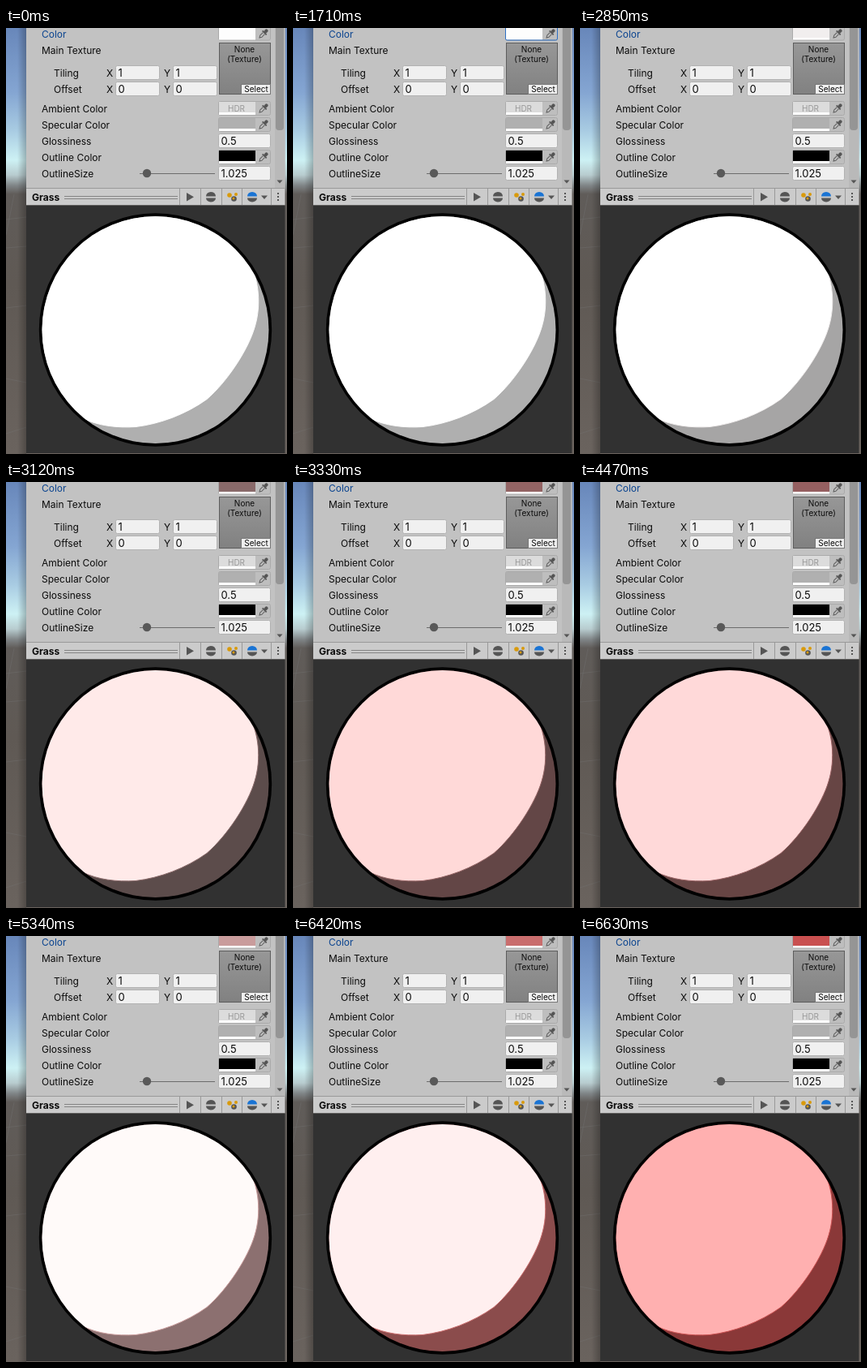
Animation of 347 by 525 pixels, one loop 8 s. Source, as an HTML page:

```html
<!DOCTYPE html>
<html lang="en">
<head>
<meta charset="utf-8">
<title>Material inspector</title>
<style>
  html, body { margin: 0; width: 100%; height: 100%; overflow: hidden; background: #313131; }
  svg { display: block; width: 347px; height: 525px; }
  text { font: 12px Inter, sans-serif; fill: #0b0b0b; }
  .small { font-size: 10px; text-anchor: middle; }
  .field { fill: #f0f0f0; stroke: #b2b2b2; }
  .swatch { stroke: #aaa; fill: #bebebe; }
  .icon { fill: #555; }
  .line { stroke: #999; }
</style>
</head>
<body>
<svg viewBox="0 0 347 525">
  <defs>
    <linearGradient id="scene" x2="0" y2="1">
      <stop offset="0" stop-color="#6887ba"/>
      <stop offset=".15" stop-color="#84a5d2"/>
      <stop offset=".24" stop-color="#a8cbe2"/>
      <stop offset=".31" stop-color="#cdf1f4"/>
      <stop offset=".345" stop-color="#b8cccf"/>
      <stop offset=".37" stop-color="#7f8486"/>
      <stop offset=".39" stop-color="#605c59"/>
      <stop offset=".6" stop-color="#5f5954"/>
      <stop offset="1" stop-color="#6a635e"/>
    </linearGradient>
    <linearGradient id="shadow">
      <stop offset="0" stop-opacity="0"/>
      <stop offset="1" stop-opacity=".25"/>
    </linearGradient>
    <linearGradient id="empty" x2="0" y2="1">
      <stop offset="0" stop-color="#979797"/>
      <stop offset="1" stop-color="#818181"/>
    </linearGradient>
    <clipPath id="ball"><circle cx="184.5" cy="372" r="140"/></clipPath>
    <g id="dropper" transform="rotate(45)">
      <rect x="-2" y="-7" width="4" height="5" rx="1.7" class="icon"/>
      <rect x="-3.5" y="-2.6" width="7" height="1.8" class="icon"/>
      <path d="M-1.5-.5V4.5L0 7L1.5 4.5V-.5" fill="none" stroke="#606060"/>
    </g>
  </defs>

  <rect width="347" height="525" fill="url(#scene)"/>
  <path d="M0 236L25 233M0 271L25 269M0 345L25 342M0 432L25 437M0 500L25 492M10 205L0 255" fill="none" stroke="#777" stroke-opacity=".35"/>
  <rect x="14" width="11" height="525" fill="url(#shadow)"/>
  <rect x="25" width="319.5" height="198" fill="#c2c2c2"/>

  <g id="labels"></g>
  <text x="44" y="12" style="fill:#0c4590">Color</text>

  <rect class="swatch" x="262.5" y="-2.5" width="64" height="17.5" rx="2"/>
  <rect id="swatch" x="263" y="-2" width="45" height="14"/>
  <rect x="263" y="12" width="45" height="2.5" fill="#fff"/>
  <rect id="focus" x="262.5" y="-2.5" width="64" height="17.5" rx="2" fill="none" stroke="#2c6fc4"/>

  <rect x="263.5" y="18.5" width="63" height="63" fill="url(#empty)" stroke="#5d5d5d"/>
  <text class="small" x="294.5" y="30">None</text>
  <text class="small" x="294.5" y="42">(Texture)</text>
  <rect x="290.5" y="69.5" width="36" height="12" fill="#efefef" stroke="#777"/>
  <text class="small" x="309" y="79">Select</text>

  <g id="swatches"></g>
  <text class="small" x="284.5" y="103" style="fill:#999">HDR</text>

  <rect x="165" y="179" width="93" height="1" fill="#6c6c6c"/>
  <circle cx="174" cy="179" r="5.2" fill="#595959"/>

  <rect x="332" width="12.5" height="198" fill="#b9b9b9"/>
  <rect x="333" y="-8" width="10" height="134" rx="4" fill="#959595"/>
  <path class="icon" d="M334.5 187.5h7l-3.5 4z"/>

  <rect x="25" y="197.5" width="319.5" height="21" fill="#cbcbcb"/>
  <path class="line" d="M25 197.5H344.5M214.5 198v21M240.5 198v21M266.5 198v21M291.5 198v21M327.5 198v21"/>
  <path d="M72 207.5H212M72 210.5H212" stroke="#858585"/>
  <text x="32" y="213" style="font-weight:700">Grass</text>
  <path class="icon" d="M223 203v10.5l9-5.2z"/>
  <g id="spheres"></g>
  <circle cx="276" cy="206" r="2.8" fill="#d99a0b"/>
  <circle cx="284" cy="205" r="2" fill="#d99a0b"/>
  <circle cx="281.5" cy="210.5" r="3.3" fill="#555"/>
  <circle cx="281" cy="210" r="1.5" fill="#d99a0b"/>
  <path class="icon" d="M315 206.5h8l-4 4.5z"/>
  <path class="icon" d="M335 203h2v2h-2zM335 207h2v2h-2zM335 211h2v2h-2z"/>

  <rect x="25" y="218.5" width="319.5" height="305.5" fill="#313131"/>
  <circle cx="184.5" cy="372" r="143.7"/>
  <g clip-path="url(#ball)">
    <rect id="shade" x="40" y="228" width="290" height="290"/>
    <path id="lit" d="M30 218H265L302 293C311 309 316 340 307 369C299 396 274 435 248 457.500C222 476 190 488 160 491.500C137 493 113 490 95 481L30 440Z"/>
  </g>
</svg>
<script>
const $ = id => document.getElementById(id);

const labels = [
  [44, 32, 'Main Texture'], [59, 60, 'Tiling'], [59, 80, 'Offset'],
  [44, 104, 'Ambient Color'], [44, 124, 'Specular Color'], [44, 144, 'Glossiness'],
  [44, 164, 'Outline Color'], [44, 184, 'OutlineSize'],
  [124, 60, 'X'], [195, 60, 'Y'], [124, 80, 'X'], [195, 80, 'Y'],
];
const fields = [
  [136, 47, 53, '1'], [207, 47, 53, '1'], [136, 67, 53, '0'], [207, 67, 53, '0'],
  [263, 131, 63, '0.5'], [263, 171, 63, '1.025'],
];
const text = ([x, y, s]) => `<text x="${x}" y="${y}">${s}</text>`;
$('labels').innerHTML = labels.map(text).join('') + fields.map(([x, y, w, s]) =>
  `<rect class="field" x="${x - .5}" y="${y - .5}" width="${w + 1}" height="17" rx="2"/>
   <text x="${x + 2.5}" y="${y + 13}" style="font-size:13px">${s}</text>`).join('');

$('swatches').innerHTML = [[91, '#dcdcdc'], [111, '#b0b0b0'], [151, '#000']].map(([y, color]) =>
  `<rect class="swatch" x="262.5" y="${y - .5}" width="64" height="17" rx="2"/>
   <rect x="263" y="${y}" width="45" height="13" fill="${color}"/>
   <rect x="263" y="${y + 13}" width="45" height="3" fill="#fff"/>`).join('') +
  [7, 99, 119, 159].map(y => `<use href="#dropper" transform="translate(318 ${y})"/>`).join('');

$('spheres').innerHTML = [[253, '#555'], [304, '#1a74d4']].map(([x, top]) =>
  `<path d="M${x - 6} 207.500a6 5.500 0 0 1 12 0z" fill="${top}"/>
   <path d="M${x - 6} 209.500a6 5 0 0 0 12 0z" fill="#555"/>`).join('');

// Time, swatch, lit side, shaded side. Lit values above 255 are overexposed.
const keys = [
  [2820, [253, 253, 253], [557, 557, 557], [175, 175, 175]],
  [3120, [137, 106, 106], [301, 234, 233], [92, 76, 75]],
  [3930, [173, 79, 79], [380, 168, 168], [118, 54, 54]],
  [4470, [149, 95, 96], [328, 217, 217], [103, 69, 68]],
  [5340, [201, 156, 156], [442, 249, 248], [140, 112, 112]],
  [5550, [201, 162, 162], [442, 356, 356], [140, 114, 114]],
  [6030, [201, 162, 162], [442, 356, 356], [140, 114, 114]],
  [6630, [201, 80, 80], [442, 176, 176], [138, 56, 56]],
];

function colorsAt(t) {
  const next = keys.findIndex(k => k[0] > t);
  if (next === 0) return keys[0].slice(1);
  if (next < 0) return keys.at(-1).slice(1);
  const a = keys[next - 1], b = keys[next];
  const u = (t - a[0]) / (b[0] - a[0]);
  return [1, 2, 3].map(i => a[i].map((v, c) => v + (b[i][c] - v) * u));
}

function draw() {
  const t = performance.now() % 8000;
  const [swatch, lit, shade] = colorsAt(t).map(c =>
    `rgb(${c.map(v => Math.min(255, Math.round(v)))})`);
  $('swatch').setAttribute('fill', swatch);
  $('lit').setAttribute('fill', lit);
  $('lit').setAttribute('stroke', swatch);
  $('shade').setAttribute('fill', shade);
  $('focus').setAttribute('visibility', t >= 1020 && t < 2310 ? 'visible' : 'hidden');
  requestAnimationFrame(draw);
}
draw();
</script>
</body>
</html>
```
